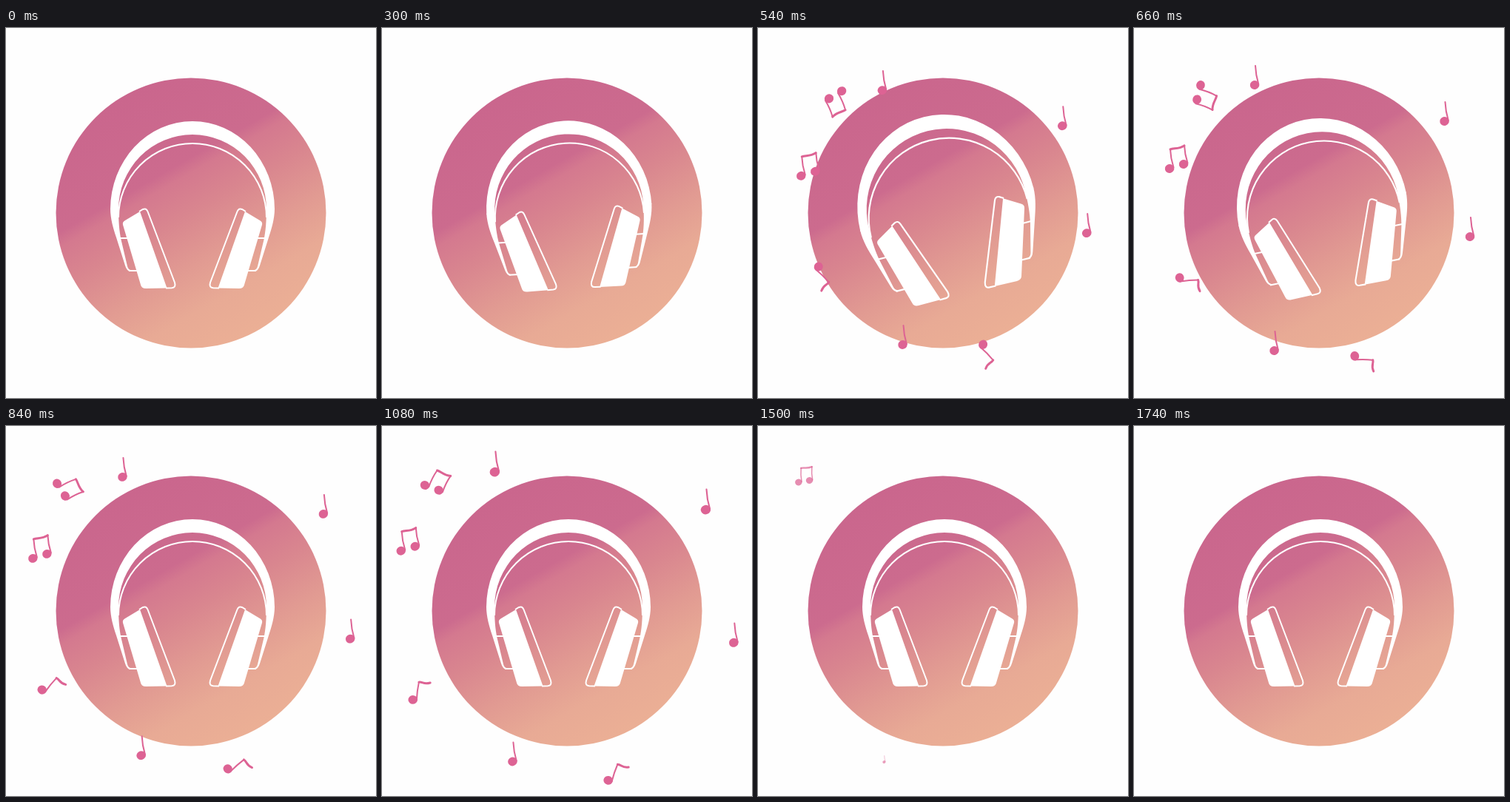
An HTML page with a canvas for the animation above (2040 ms loop, 500 px wide and 500 px high).

```html
<!DOCTYPE html>
<html lang="en">
<head>
<meta charset="utf-8">
<title>Headphones</title>
<style>
  html, body { margin: 0; width: 100%; height: 100%; overflow: hidden; background: #fefefe; }
  canvas { display: block; width: 500px; height: 500px; }
</style>
</head>
<body>
<canvas id="stage" width="500" height="500"></canvas>
<script>
const ctx = document.getElementById('stage').getContext('2d');
const LOOP = 2040, STEP = 30, PINK = '#dd6394';
const clamp = v => Math.max(0, Math.min(1, v));
const smooth = v => { v = clamp(v); return v * v * (3 - 2 * v); };
const rad = deg => deg * Math.PI / 180;

// at: centre at 420 ms, go: drift, spin: [turn, rest angle, decay]
const notes = [
  { draw: quarter, at: [174, 82], go: [-22, -32], born: 330, leave: 985 },
  { draw: quarter, at: [401, 129], go: [37, -28], born: 300, leave: 985 },
  { draw: quarter, at: [432, 260], go: [44, 22], born: 375, leave: 1042 },
  { draw: quarter, at: [203, 407], go: [-27, 36], born: 300, leave: 1140 },
  { draw: eighth, at: [100, 327], go: [-51, 32], spin: [227, -13, .0032], born: 300, leave: 1080 },
  { draw: eighth, at: [305, 430], go: [11, 40], spin: [208, -1, .0031], born: 300, leave: 1072 },
  { draw: pair, at: [120, 110.5], go: [-47, -36], spin: [236, -8, .0025], born: 360, leave: 1195 },
  { draw: pair, at: [80.5, 198.5], go: [-46, -44], born: 420, leave: 1095 }
];

function head(x, y) {
  ctx.beginPath();
  ctx.ellipse(x, y, 6.3, 5.9, -0.3, 0, 7);
  ctx.fill();
}

function stem(x0, y0, x1, y1) {
  ctx.lineWidth = 2;
  ctx.beginPath();
  ctx.moveTo(x0, y0);
  ctx.quadraticCurveTo(x1 + .5, (y0 + y1) / 2, x1, y1);
  ctx.stroke();
}

function beam(x0, y0, x1, y1) {
  ctx.lineWidth = 3;
  ctx.beginPath();
  ctx.moveTo(x0, y0);
  ctx.bezierCurveTo(x0 + 5, y0 - 2, x1 - 8, y1 + 5, x1, y1);
  ctx.stroke();
}

function quarter() {
  head(0, 11);
  stem(5.3, 10, 1, -15);
}

function eighth() {
  head(-5, 13);
  stem(0, 12, -3, -12);
  beam(-3, -12, 12, -15);
}

function pair() {
  head(-9.5, 13.5);
  head(9.5, 7.5);
  stem(-4, 12, -8.5, -12.5);
  stem(15, 6, 10.5, -18);
  beam(-8.5, -12.5, 10.5, -17.5);
}

function drawNote(n, t) {
  const out = clamp((t - n.leave) / 390);
  if (t <= n.born || out >= 1) return;
  const drift = 1.4 * (1 - Math.exp(-.00184 * (t - 420)));
  const scale = 1 - out * out * (2.7 * out - 1.7);
  ctx.save();
  ctx.globalAlpha = clamp((t - n.born) / 100) * clamp(1.4 - .85 * out);
  ctx.translate(n.at[0] + n.go[0] * drift, n.at[1] + n.go[1] * drift);
  if (n.spin) {
    const [turn, rest, decay] = n.spin;
    ctx.rotate(rad(rest + turn * Math.exp(-decay * (t - 420))));
  }
  ctx.scale(scale, scale);
  ctx.fillStyle = ctx.strokeStyle = PINK;
  ctx.lineCap = ctx.lineJoin = 'round';
  n.draw();
  ctx.restore();
}

function drawDisc() {
  const g = ctx.createLinearGradient(160, 92, 340, 408);
  [[0, '#ca668d'], [.32, '#cc6b8e'], [.37, '#d4798f'], [.5, '#d9868f'],
   [.67, '#e19a92'], [.83, '#e8aa95'], [1, '#ebaf95']].forEach(s => g.addColorStop(...s));
  ctx.fillStyle = g;
  ctx.beginPath();
  ctx.arc(250, 250, 182.5, 0, 7);
  ctx.fill();
}

// Left ear piece, relative to the symmetry axis
function drawSide() {
  ctx.fill(new Path2D('M-111 244 C-111 258 -107 271 -103 283 L-91 321 Q-89 328 -84 329 L-84 327 ' +
    'Q-87 326 -88 322 L-96.5 286 C-99 274 -100 262 -100 241 Z'));
  ctx.fill(new Path2D('M-94 266 Q-95 262 -91 260 L-71 248 L-34.5 351.5 L-63 352 Q-69 352 -70 347 Z'));
  ctx.stroke(new Path2D('M-98 284 H-87 M-86 328 H-73'));
  ctx.stroke(new Path2D('M-72 248 L-67 245 Q-62.5 243 -60.5 248 L-24 344 Q-22 351 -28 351.3 L-36 351.5'));
}

function drawHeadphones(t) {
  const swing = clamp((t - 270) / 540);
  const tilt = -14 * Math.pow(Math.sin(Math.PI * swing), .78);
  const grow = 1 + .1 * (t < 450 ? smooth((t - 270) / 190) : 1 - smooth((t - 460) / 350));
  ctx.save();
  ctx.translate(252, 232);
  if (swing > 0 && swing < 1) {
    ctx.rotate(rad(tilt));
    ctx.scale(grow, grow);
  }
  ctx.translate(0, -232);
  ctx.fillStyle = ctx.strokeStyle = '#fff';
  ctx.lineWidth = 2;
  ctx.beginPath();
  ctx.ellipse(0, 245, 111, 119, 0, Math.PI, 0);
  ctx.ellipse(0, 245, 100, 101, 0, 0, Math.PI, true);
  ctx.fill();
  ctx.beginPath();
  ctx.arc(0, 256, 100, Math.PI, 0);
  ctx.stroke();
  drawSide();
  ctx.scale(-1, 1);
  drawSide();
  ctx.restore();
}

const start = performance.now();
function frame() {
  const now = Math.max(0, performance.now() - start) % LOOP;
  const t = Math.floor(now / STEP) * STEP;
  ctx.fillStyle = '#fefefe';
  ctx.fillRect(0, 0, 500, 500);
  drawDisc();
  notes.forEach(n => drawNote(n, t));
  drawHeadphones(t);
  requestAnimationFrame(frame);
}
frame();
</script>
</body>
</html>
```
